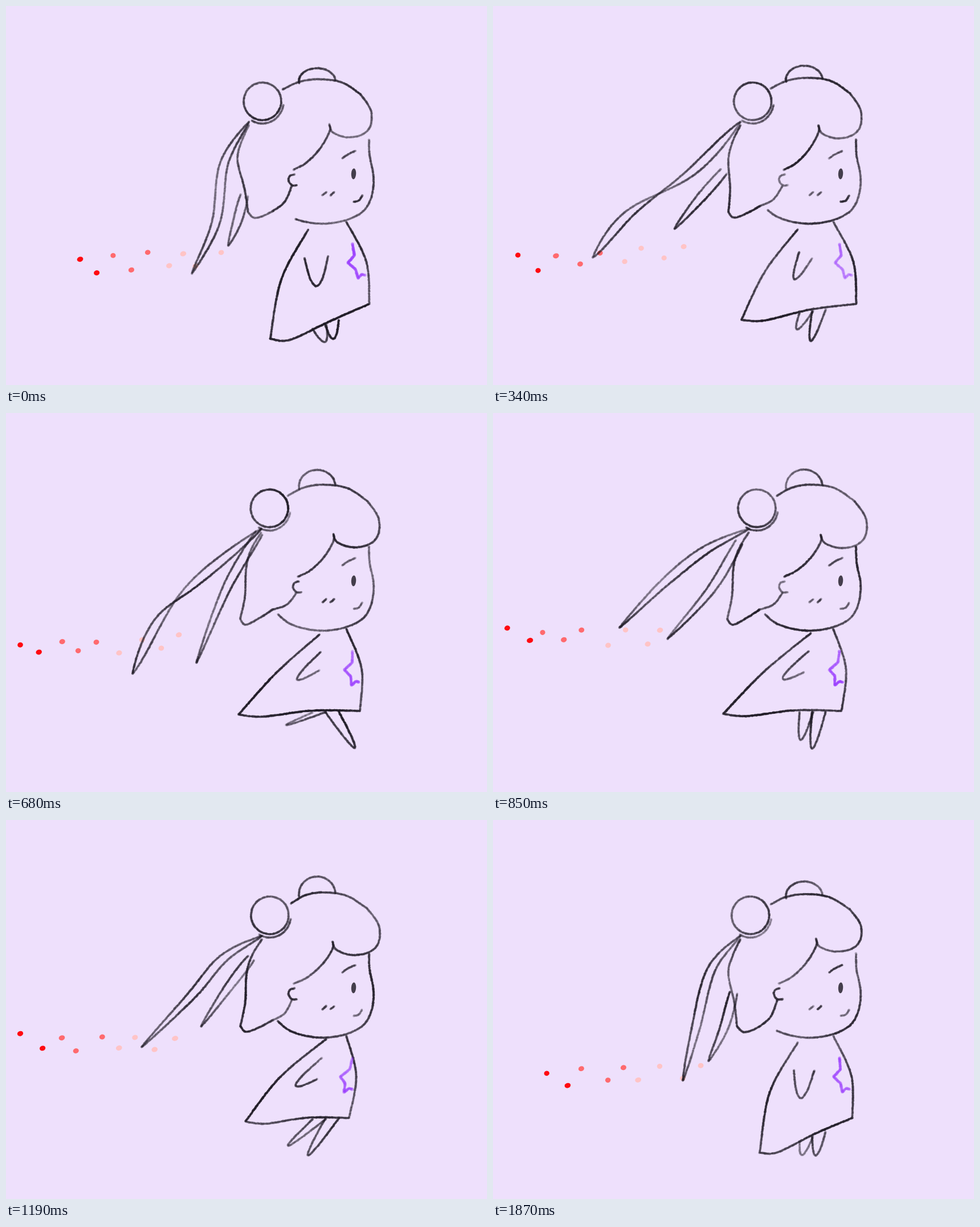
Recreate the animation shown at these times as an HTML page with a canvas. Size 844 by 664 pixels, loop 2040 ms.

```html
<!DOCTYPE html>
<html lang="en">
<head>
<meta charset="utf-8">
<title>Ribbons in the wind</title>
<style>
html, body { margin: 0; width: 100%; height: 100%; overflow: hidden; background: #eee0fc; }
canvas { display: block; width: 100vw; height: 100vh; }
</style>
</head>
<body>
<canvas id="stage" width="844" height="664"></canvas>
<script>
const ctx = document.getElementById('stage').getContext('2d');
const HOLD = 170, STEPS = 12, INK = '#1e1a24', VIOLET = '#9a3cff';

// Ribbons and toes flutter freely, so they get a few key points;
// all the rest sways on cosine waves.
const keys = [
  { at: 0, long: [[383, 275], [368, 380], [326, 469]], lobes: 1,
    short: [[418, 332], [405, 380], [390, 420]], toes: [[560, 589], [575, 583]] },
  { at: 2, long: [[348, 291], [239, 364], [175, 441]], lobes: 2,
    short: [[405, 290], [360, 341], [318, 391]], toes: [[534, 567], [558, 587]] },
  { at: 4, long: [[332, 297], [268, 364], [222, 457]], lobes: 2,
    short: [[444, 210], [388, 305], [334, 438]], toes: [[492, 547], [612, 587]] },
  { at: 5, long: [[373, 240], [300, 298], [222, 376]], lobes: 1,
    short: [[432, 226], [382, 310], [306, 396]], toes: [[540, 573], [560, 588]] },
  { at: 7, long: [[382, 242], [325, 308], [238, 398]], lobes: 1,
    short: [[430, 242], [392, 291], [342, 362]], toes: [[495, 571], [530, 588]] },
  { at: 9, long: [[367, 287], [335, 392], [287, 410]], lobes: 1,
    short: [[418, 286], [388, 324], [360, 354]], toes: [[482, 550], [612, 577]] },
  { at: 11, long: [[383, 262], [355, 368], [333, 457]], lobes: 1,
    short: [[422, 303], [405, 365], [378, 423]], toes: [[543, 587], [567, 588]] }
];

const mix = (a, b, t) => a + (b - a) * t;
const between = (p, q, t) => [mix(p[0], q[0], t), mix(p[1], q[1], t)];
const shift = ([x, y], dx, dy) => [x + dx, y + dy];

let seed = 1;
const rnd = () => (seed = seed * 16807 % 2147483647) / 2147483647;

// Piecewise linear map through matching stops
function remap(v, from, to) {
  let i = 0;
  while (i < from.length - 2 && v > from[i + 1]) i++;
  return mix(to[i], to[i + 1], (v - from[i]) / (from[i + 1] - from[i]));
}

function blend(a, b, t) {
  if (typeof a === 'number') return mix(a, b, t);
  if (Array.isArray(a)) return a.map((v, i) => blend(v, b[i], t));
  return Object.fromEntries(Object.keys(a).map(k => [k, blend(a[k], b[k], t)]));
}

function keyAt(step) {
  let i = keys.length - 1;
  while (keys[i].at > step) i--;
  const a = keys[i], b = keys[i + 1] || a;
  return blend(a, b, a === b ? 0 : (step - a.at) / (b.at - a.at));
}

// Catmull-Rom curve through the points
function curve(pts, fine = 16) {
  const out = [], at = i => pts[Math.max(0, Math.min(pts.length - 1, i))];
  for (let i = 0; i < pts.length - 1; i++) {
    const [a, b, c, d] = [at(i - 1), at(i), at(i + 1), at(i + 2)];
    for (let k = i ? 1 : 0; k <= fine; k++) {
      const t = k / fine;
      out.push([0, 1].map(x => b[x] + t / 2 * (c[x] - a[x] +
        t * (2 * a[x] - 5 * b[x] + 4 * c[x] - d[x] + t * (3 * (b[x] - c[x]) + d[x] - a[x])))));
    }
  }
  return out;
}

function arc(x, y, rx, ry, from, to) {
  return Array.from({ length: 41 }, (_, i) => {
    const a = mix(from, to, i / 40) * Math.PI / 180;
    return [x + rx * Math.cos(a), y + ry * Math.sin(a)];
  });
}

function disc(x, y, rx, ry = rx, turn = 0) {
  ctx.beginPath();
  ctx.ellipse(x, y, rx, ry, turn, 0, 7);
  ctx.fill();
}

// Grainy pencil line made of overlapping stamps, with wandering pressure
function pencil(points, { press = 0.72, width = 4, ink = INK } = {}) {
  const base = press + (rnd() - 0.5) * 0.24, phase = rnd() * 6;
  let rest = 0, run = 0;
  ctx.fillStyle = ink;
  for (let i = 1; i < points.length; i++) {
    const [x0, y0] = points[i - 1], [x1, y1] = points[i];
    const len = Math.hypot(x1 - x0, y1 - y0);
    for (; rest < len; rest += 1.1) {
      const cover = Math.min(0.96, base + 0.12 * Math.sin((run + rest) / 32 + phase));
      ctx.globalAlpha = 1 - Math.pow(1 - cover, 0.36 + 0.12 * (rnd() - 0.5));
      const [x, y] = between(points[i - 1], points[i], rest / len);
      disc(x + (rnd() - 0.5) * 0.8, y + (rnd() - 0.5) * 0.8, width / 2 * (0.88 + 0.28 * rnd()));
    }
    rest -= len;
    run += len;
  }
  ctx.globalAlpha = 1;
}

const line = (pts, look) => pencil(curve(pts), look);

// Narrow U from a to b around a tip
function loop(a, tip, b, look) {
  const dx = (a[0] - b[0]) * 0.13, dy = (a[1] - b[1]) * 0.13;
  line([a, shift(between(a, tip, 0.7), dx, dy), tip, shift(between(b, tip, 0.7), -dx, -dy), b], look);
}

// Two edges either side of a centre line, crossing once per lobe
function ribbon(pts, width, open, lobes) {
  const mid = curve(pts);
  for (const side of [-1, 1]) {
    pencil(mid.map(([x, y], i) => {
      const [x0, y0] = mid[Math.max(0, i - 1)], [x1, y1] = mid[Math.min(mid.length - 1, i + 1)];
      const len = Math.hypot(x1 - x0, y1 - y0) || 1;
      const off = side * width * Math.sin(Math.PI * mix(open, lobes, i / (mid.length - 1)));
      return [x - off * (y1 - y0) / len, y + off * (x1 - x0) / len];
    }), { press: 0.66 });
  }
}

// 1 at the given step, 0 half a loop later
const wave = (step, peak) => (1 + Math.cos((step - peak) * Math.PI * 2 / STEPS)) / 2;

function drawHair(s, knot, ear) {
  const rest = wave(s, 0), lag = wave(s, 0.5);
  const cusp = 575 - 8 * wave(s, 11), top = 125.5 + 5 * wave(s, 10) ** 2, low = 237 - 7 * rest;
  const fit = ([x, y]) => [
    remap(x, [489, 577, 652], [500 - 15 * lag, cusp, 655 - 15 * lag ** 3]),
    remap(y, [127, 234], [top, low])
  ];
  line([[489, 146], [520, 132], [558, 127], [600, 133], [633, 155]].map(fit));
  line([[633, 155], [651, 183], [651, 212], [636, 229], [608, 234], [583, 225], [577, 211]].map(fit));
  line([[577, 211], [577, 224], [560, 252], [535, 276], [511, 288]].map(([x, y]) =>
    [remap(x, [511, 577], [ear[0], cusp]), remap(y, [211, 288], [low - 23, ear[1]])]));
  line([[2, 8], [-6, 11], [-8, 19], [-2, 27], [7, 27]].map(p => shift(ear, ...p)), { press: 0.65 });

  const bun = [463 - 13 * rest ** 2, 167], r = 33;
  pencil(arc(...bun, r, r, -100, 258), { press: 0.8 });
  pencil(arc(...bun, r + 4, r + 6, 10, 122), { press: 0.6 });
  pencil(arc(546, top + 3, 32, top + 3 - (99 + 10 * rest ** 2), 170, 358));

  const side = 422 - 17 * lag ** 4, corner = [411 + 17 * wave(s, 11) ** 3, 361];
  const lock = [468, 344 + 18 * wave(s, 10.5)], tail = shift(ear, -2, 28);
  line([shift(knot, 0, 6), [mix(knot[0], side, 0.65), 238], [side, 270],
    [mix(side, corner[0], 0.5) + 3, 320], corner]);
  line([corner, shift(corner, 10, 10), shift(between(corner, lock, 0.6), 0, 8), lock], { press: 0.8 });
  line([lock, shift(between(lock, tail, 0.5), 4, 6), tail], { press: 0.6 });
}

function drawFace(s) {
  const jawEnd = 476 + 30 * wave(s, 0) ** 6, eye = [610, 294];
  const near = (pts, look) => line(pts.map(p => shift(eye, ...p)), look);
  pencil(curve([[637, 234], [638, 262], [645, 300], [641, 335], [625, 361], [590, 377],
    [545, 381], [500, 370], [472, 348]]).filter(([x]) => x > jawEnd));
  near([[-20, -27], [-10, -34], [3, -40]], { press: 0.65 });
  near([[0, 49], [9, 47], [15, 38]]);
  for (const x of [-48, -34]) near([[x, 32], [x - 7, 38]]);
  ctx.fillStyle = INK;
  ctx.globalAlpha = 0.82;
  disc(...eye, 4.2, 9.5, 0.06);
  ctx.globalAlpha = 1;
}

function drawDress(s, toes) {
  const rest = wave(s, 0), lag = wave(s, 1), calm = rest ** 2;
  const neck = [562 - 32 * wave(s, 0.5), 384 + 8 * lag], collar = [597, 378];
  const back = [404 + 64 * wave(s, 11), 527 + 58 * wave(s, 11.5) ** 2];
  const front = [602 + 38 * lag, 522];
  const bulge = 20 - 14 * wave(s, 4.3), sag = 5 + 9 * rest ** 6;

  line([neck, shift(between(neck, back, 0.5), -bulge * 0.8, -bulge * 0.5), back], { press: 0.82 });
  line([back, shift(between(back, front, 0.2), 0, sag),
    shift(between(back, front, 0.6), 0, sag - 8), front], { press: 0.86 });
  line([collar, shift(between(collar, front, 0.5), 15, -2), front], { press: 0.76 });

  const hem = x => [x, remap(x, [back[0], front[0]], [back[1], front[1]]) + sag - 5];
  toes.forEach((toe, i) => loop(hem(538 + i * 22), toe, hem(562 + i * 22), { press: 0.66 + i * 0.14 }));

  loop([554 - 30 * calm, 417 + 25 * calm], [508 + 37 * calm, 464 + 27 * calm],
    [545 + 20 * rest, 455 - 17 * rest]);
  const tilt = 0.44 * lag - 0.2;
  pencil([[0, 0], [-1, 20], [-15, 33], [-4, 44], [-3, 60], [5, 53], [11, 55]]
    .map(([x, y]) => [608 + x + y * tilt, 417 + y]), { ink: VIOLET, width: 5, press: 0.66 });
}

// Zigzag trail that pales towards the ribbons
function drawSparks(s) {
  const calm = wave(s, 0);
  const head = [25 + 105 * calm ** 6, 455 - 75 * wave(s, 6) ** 2];
  const tail = [300 + 70 * calm ** 2, 440 - 50 * wave(s, 6)];
  for (let i = 0; i < 9; i++) {
    const [x, y] = between(head, tail, i / 8);
    ctx.fillStyle = i < 2 ? '#ff0a10' : i < 5 ? '#ff6a6e' : '#ffc4c6';
    disc(x + (i && (rnd() - 0.5) * 16), y + (i % 2 ? 11 : -11) + (rnd() - 0.5) * 10,
      4.6 + rnd(), 4.4, -0.3);
  }
}

function drawStep(s) {
  const key = keyAt(s);
  const knot = [449 - 24 * wave(s, 0.5) ** 3, 203], ear = [499 + 13 * wave(s, 3.5), 287];
  seed = 911 + s * 3701;
  for (let i = 0; i < 5; i++) rnd();
  ctx.fillStyle = '#eee0fc';
  ctx.fillRect(0, 0, 844, 664);
  drawSparks(s);
  ribbon([knot, ...key.long], 8, 0, Math.round(key.lobes));
  ribbon(key.short, 8, 0.3, 1);
  drawHair(s, knot, ear);
  drawFace(s);
  drawDress(s, key.toes);
}

let shown = -1;
function tick() {
  const step = Math.floor(performance.now() / HOLD) % STEPS;
  if (step !== shown) drawStep(shown = step);
  requestAnimationFrame(tick);
}
tick();
</script>
</body>
</html>
```
